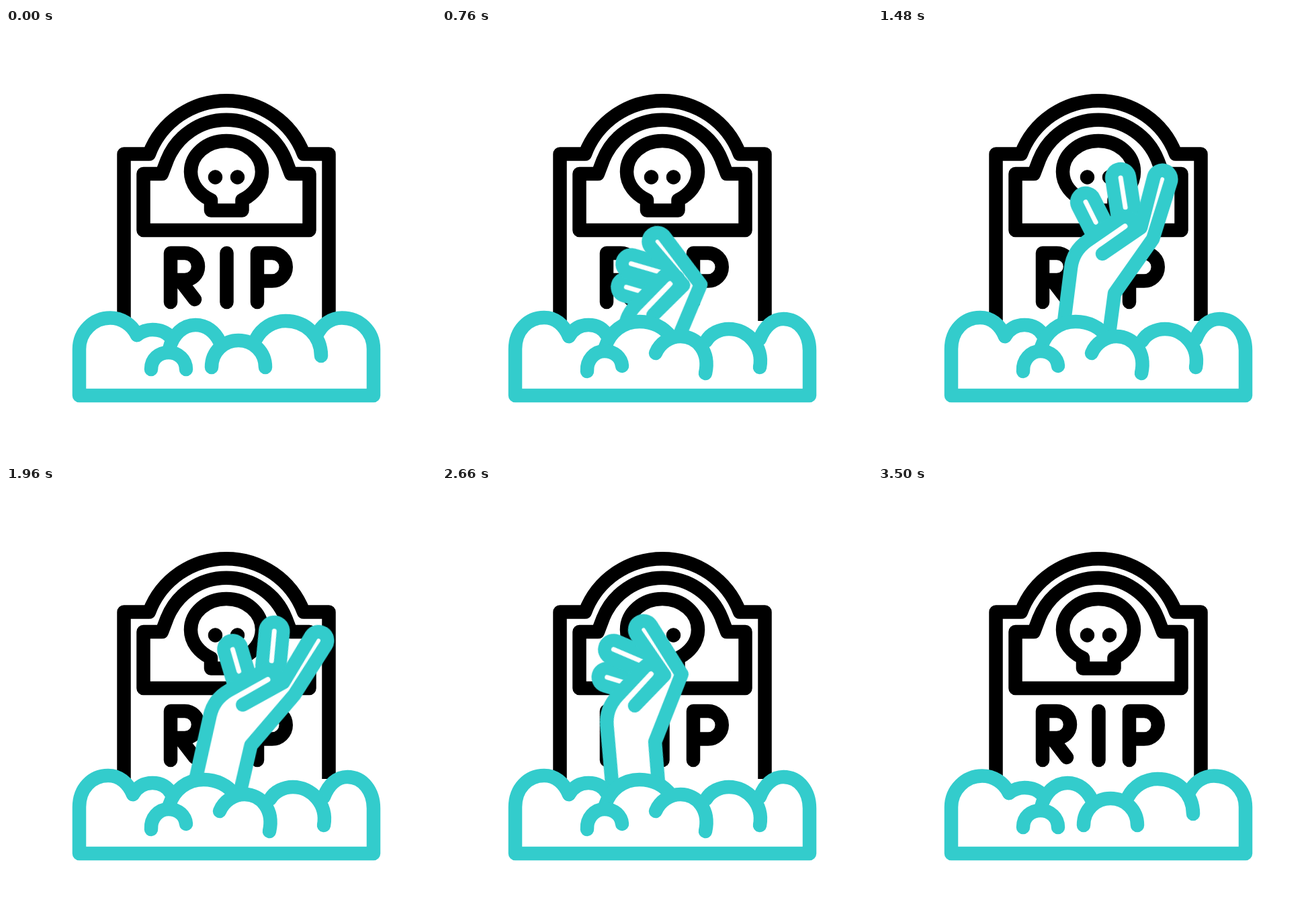
Recreate the animation shown at these times as an HTML page without scripts. Size 640 by 640 pixels, loop 3.6 s.

```html
<!DOCTYPE html>
<html lang="en">
<head>
<meta charset="utf-8">
<title>Hand rising from a grave</title>
<style>
html, body { margin: 0; width: 100%; height: 100%; overflow: hidden; background: #fff; }
svg { display: block; width: 100%; height: 100%; }
path, line { fill: none; stroke-width: 20.5; stroke-linecap: round; stroke-linejoin: round; }
.stone { stroke: #000; }
.teal path, .teal line { stroke: #3cc; }
.mound path, .palm { fill: #fff; }
.mound path { d: var(--rest); animation: heave 3.6s infinite ease-in-out; }
.teal .finger { stroke-width: 46.5; }
.teal .slit { stroke: #fff; stroke-width: 7; }

.rise { animation: rise 3.6s infinite ease-in-out; }
.sway { transform-origin: 312px 450px; animation: sway 3.6s infinite; }
.palm { animation: grip 3.6s infinite; }
.bend { transform-origin: var(--joint); animation: bend 3.6s infinite; }
.middle { --joint: 370px 283px; --shut: -56deg; --rising: -53.7deg; --wide: 8.8deg; --fist: -45.6deg; }
.ring { --joint: 350px 283px; --shut: -38deg; --rising: -36deg; --wide: 5deg; --fist: -34deg; }

@keyframes heave {
  0%, 1.5%, 96%, 100% { d: var(--rest); }
  20.5%, 75% { d: var(--bulge); }
}
@keyframes rise {
  0%, 2.8% { transform: translateY(275px); }
  33.6%, 41.1% { transform: translateY(0); }
  54.4% { transform: translateY(-13px); }
  73.9%, 75% { transform: translateY(-7px); }
  99.7%, 100% { transform: translateY(275px); }
}
@keyframes sway {
  0%, 13% { transform: translateX(4px) rotate(-12deg); animation-timing-function: ease-in; }
  21.1% { transform: translateX(2.5px) rotate(-11deg); animation-timing-function: cubic-bezier(.45, .05, .7, .75); }
  41.1% { transform: none; animation-timing-function: ease-out; }
  54.4% { transform: translateX(7.5px) rotate(5.5deg); animation-timing-function: ease-in-out; }
  73.9% { transform: translateX(-22.4px) rotate(-12.2deg); animation-timing-function: ease-in-out; }
  87.2%, 100% { transform: translateX(-17px) rotate(-12deg); }
}
@keyframes bend {
  0%, 13% { transform: rotate(var(--shut)); animation-timing-function: ease-in; }
  21.1% { transform: rotate(var(--rising)); animation-timing-function: cubic-bezier(.45, .05, .7, .75); }
  41.1% { transform: rotate(0deg); animation-timing-function: ease-out; }
  54.4% { transform: rotate(var(--wide)); animation-timing-function: ease-in-out; }
  73.9% { transform: rotate(var(--fist)); animation-timing-function: ease-out; }
  87.2%, 100% { transform: rotate(var(--shut)); }
}
/* Only the index finger and its knuckle change shape. */
@keyframes grip {
  0%, 13% {
    d: path("M264 540L287 357Q290 332 311 317L360 283A13.5 13.5 0 0 1 375 307L334 336L386.5 301L344.5 234.5A13 13 0 0 1 367.5 222L412 305L352 395L330 560");
    animation-timing-function: ease-in;
  }
  21.1% {
    d: path("M264 540L287 357Q290 332 311 317L360 283A13.5 13.5 0 0 1 375 307L334 336L386.5 301L349 235A13 13 0 0 1 372 223L412 305L352 395L330 560");
    animation-timing-function: cubic-bezier(.45, .05, .7, .75);
  }
  41.1% {
    d: path("M264 540L287 357Q290 332 311 317L360 283A13.5 13.5 0 0 1 375 307L334 336L391 297L410.5 221A13 13 0 0 1 435.5 229L409 314L352 395L330 560");
    animation-timing-function: ease-out;
  }
  54.4% {
    d: path("M264 540L287 357Q290 332 311 317L360 283A13.5 13.5 0 0 1 375 307L334 336L391 297L425.6 224A13 13 0 0 1 448.8 236L409 314L352 395L330 560");
    animation-timing-function: ease-in-out;
  }
  73.9% {
    d: path("M264 540L287 357Q290 332 311 317L360 283A13.5 13.5 0 0 1 375 307L334 336L386.5 301L358.5 233A13 13 0 0 1 382.7 223.5L412 305L352 395L330 560");
    animation-timing-function: ease-out;
  }
  87.2%, 100% {
    d: path("M264 540L287 357Q290 332 311 317L360 283A13.5 13.5 0 0 1 375 307L334 336L386.5 301L344.5 234.5A13 13 0 0 1 367.5 222L412 305L352 395L330 560");
  }
}
</style>
</head>
<body>
<svg viewBox="0 0 640 640" role="img" aria-label="Gravestone reading RIP with a hand reaching out of the soil">
  <clipPath id="above"><path d="M0 0H640V535H0Z"/></clipPath>

  <g class="stone">
    <path d="M175.5 436V187.5H213A123 123 0 0 1 443 187.5H480.5V436" style="stroke-linecap:butt"/>
    <path d="M204.5 301V217H232L240 196A95 95 0 0 1 416 196L424 217H451.5V301Z"/>
    <path d="M328 168C298 168 275 189 275 214C275 233 288 248 305 256V271.5H351.5V256C368 248 381 233 381 214C381 189 358 168 328 168Z"/>
    <circle cx="311.5" cy="222" r="10.3"/>
    <circle cx="344.5" cy="222" r="10.3"/>
    <path d="M245 408V335H266A20 20 0 0 1 266 375H245M261 378L281 404"/>
    <path d="M328.5 335V408"/>
    <path d="M374 408V335H396A20.7 20.7 0 0 1 396 376.5H374"/>
  </g>

  <g class="teal" clip-path="url(#above)">
    <g class="rise"><g class="sway">
      <g class="bend ring">
        <line class="finger" x1="309" y1="259" x2="331" y2="302"/>
        <line class="slit" x1="309" y1="259" x2="324" y2="289"/>
      </g>
      <g class="bend middle">
        <line class="finger" x1="361" y1="223" x2="369" y2="275"/>
        <line class="slit" x1="361" y1="223" x2="368" y2="267"/>
      </g>
      <path class="palm"/>
    </g></g>
  </g>

  <g class="teal mound">
    <path style='--rest:path("M462 458C470 441 484 431.5 500 431.5C526 431.5 547 451 547 478V547H109V478C109 452 130 431.5 155 431.5C172 431.5 187 441 195 457");
      --bulge:path("M473 463C480 444 493 433 508 433C532 433 547 455 547 480V547H109V478C109 450 128 431 152 431C168 431 181 441 189 459")'/>
    <path style='--rest:path("M195 457C203 451 210 449 218 449C229 449 238 452 245 460");
      --bulge:path("M189 459C197 445 208 442 218 442C230 442 240 447 246 458")'/>
    <path style='--rest:path("M243 478C248 456 264 442 282 442C298 442 311 452 318 467");
      --bulge:path("M243 475C250 452 270 437 294 437C313 437 330 445 341 460")'/>
    <path style='--rest:path("M372 463C381 446 398 436 416 436C446 436 469 458 469 488");
      --bulge:path("M393 466C400 454 414 448 427 448C455 448 479 474 473 505")'/>
    <path style='--rest:path("M216 508C216 492 228 483 242 483C257 483 268 494 268 508");
      --bulge:path("M216 511C215 494 227 481 242 481C257 481 267 491 268 503")'/>
    <path style='--rest:path("M306 505C306 481 325 465 346 465C369 465 386 483 386 505");
      --bulge:path("M318 484C324 469 339 459 355 459C380 459 399 482 392 514")'/>
  </g>
</svg>
</body>
</html>
```
